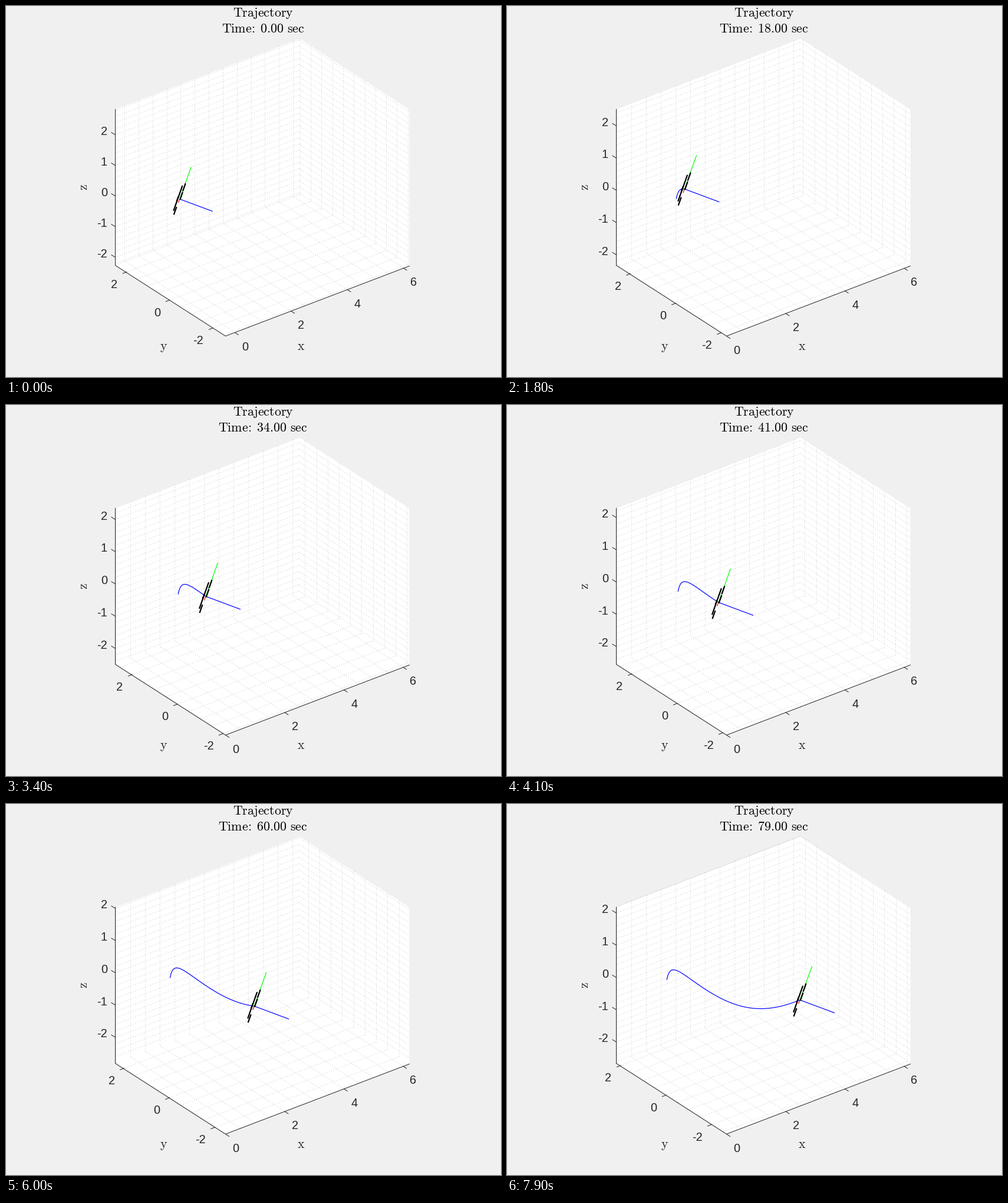
These frames come from a looping animation (840 px wide and 630 px high, 8000 ms). A matplotlib script:

```python
import matplotlib.pyplot as plt
import numpy as np
from matplotlib.animation import FuncAnimation
from matplotlib.collections import LineCollection

W, H, DPI = 840, 630, 100
FRAMES, STEP = 80, 100
PX = 72 / DPI                      # one pixel in points
INK = "#262626"

plt.rcParams["font.family"] = "Liberation Sans"
plt.rcParams["mathtext.fontset"] = "cm"

# Orthographic view: azimuth -37.5, elevation 30 degrees
AZ, EL = np.radians(37.5), np.radians(30)
EX = np.array([np.cos(AZ), -np.sin(AZ) * np.sin(EL)])
EY = np.array([-np.sin(AZ), -np.cos(AZ) * np.sin(EL)])
EZ = np.array([0, -np.cos(EL)])

FRONT = np.array([372, 560])       # screen corner of x, y, z minimum
BOX_W, BOX_D, BOX_H = 312, 187, 265
X_MAX = 6.22
SCALE = BOX_W / EX[0] / X_MAX

# Vehicle in pixels around its centre: body axes, rotors seen edge-on, arm
RED, GREEN, BLUE = (-2.5, 6.5), (20.5, -57.2), (59, 22)
ROTOR = np.array([-5, 14])
ROTORS = [np.array([p, p + ROTOR]) for p in ([10.5, -28], [5.5, -12.5], [-5.5, 14])]
BLADES = ROTORS + [np.array([[5, -24], [-11, 21]]), np.array([[-2, -5], [-5.5, 4]])]


def path(t):
    """Screen offset from the start: speeding up sideways, swinging vertically."""
    def ramp(s):
        return 51.75 * np.logaddexp(0, (s - 28) / 11.5)

    def swing(s):
        return 33 * np.sin(.0655 * (s - 39.95))

    return np.array([ramp(t) - ramp(0), swing(t) - swing(0)])


def ease(a, b, u):
    return a + (b - a) * (1 - np.cos(np.pi * u)) / 2


def y_centre(t):
    return ease(-.02, .33, t / 31) if t < 31 else ease(.33, -.22, (t - 31) / 48)


def z_centre(t):
    return max(.32 - .0006 * t * t, -.04) - .32 * np.sin(.063 * max(t - 38, 0))


def steps(lo, hi, unit):
    """Multiples of unit between lo and hi."""
    return unit * np.arange(np.ceil(lo / unit - 1e-6), np.floor(hi / unit + 1e-6) + 1)


def roman(*words):
    return "$" + r"\ ".join(r"\text{%s}" % w for w in words) + "$"


fig = plt.figure(figsize=(W / DPI, H / DPI), dpi=DPI, facecolor="#f0f0f0")
ax = fig.add_axes([0, 0, 1, 1])
ax.set_xlim(-.5, W - .5)
ax.set_ylim(H - .5, -.5)
ax.axis("off")


def segments(color, width, layer, **kw):
    lines = LineCollection([], colors=color, linewidths=width * PX, zorder=layer, **kw)
    ax.add_collection(lines, autolim=False)
    return lines


ax.fill([185, 498, 684, 684, 372, 185], [175, 55, 175, 441, 560, 440],
        color="white", lw=0, zorder=0)
ax.plot([185, 185, 372, 684], [175, 440, 560, 441], color=INK, lw=PX, zorder=2)
grid = segments([(.1, .1, .1, .25)], 1, 1, linestyles=[(0, (1, 3))])
ticks = segments(INK, 1, 2)
trail, = ax.plot([], [], color="#0000ff", lw=1.2 * PX, zorder=3)
triad = segments(["#ff0000", "#00ff00", "#0000ff"], 1.2, 4)
blades = segments("black", 2.2, 5)

tex = dict(fontsize=22 * PX, ha="center", va="baseline")
ax.text(435.5, 18, roman("Trajectory"), color="black", **tex)
clock = ax.text(435.5, 44.3, "", color="black", **tex)
ax.text(500, 583, roman("x"), color=INK, **tex)
ax.text(267.5, 583, roman("y"), color=INK, **tex)
ax.text(131.5, 307, roman("z"), color=INK, fontsize=22 * PX, rotation=90,
        ha="center", va="center")

labels = []


def tick(marks, at, way, value, shift, align):
    marks.append([at, at + way])
    x, y = at + shift
    labels.append(ax.text(x, y, str(int(round(value))), color=INK,
                          fontsize=20 * PX, ha=align, va="center_baseline"))


def draw(n):
    x0 = min(0, -.33 + .036 * n)
    scale = BOX_W / EX[0] / (X_MAX - x0)
    ex, ey, ez = EX * scale, EY * scale, EZ * scale
    dy, dz = BOX_D / -ey[0], BOX_H / -ez[1]
    y0, z0 = y_centre(n) - dy / 2, z_centre(n) - dz / 2
    y1, z1 = y0 + dy, z0 + dz

    def at(x, y, z):
        return FRONT + (x - x0) * ex + (y - y0) * ey + (z - z0) * ez

    lines = []
    for x in steps(x0, X_MAX, .5):
        lines.append([at(x, y0, z0), at(x, y1, z0), at(x, y1, z1)])
    for y in steps(y0, y1, .5):
        lines.append([at(x0, y, z0), at(X_MAX, y, z0), at(X_MAX, y, z1)])
    for z in steps(z0, z1, .2):
        lines.append([at(x0, y1, z), at(X_MAX, y1, z), at(X_MAX, y0, z)])
    grid.set_segments([p for a, b, c in lines for p in ([a, b], [b, c])])

    while labels:
        labels.pop().remove()
    marks = []
    for x in steps(x0, X_MAX, 2):
        tick(marks, at(x, y0, z0), (6.5, 4.2), x, (17.5, 22.8), "center")
    for y in steps(y0, y1, 2):
        tick(marks, at(x0, y, z0), (-7.5, 2.9), y, (-16, 20), "right")
    for z in steps(z0, z1, 1):
        tick(marks, at(x0, y1, z), (-7, -4.3), z, (-13.5, -7.4), "right")
    ticks.set_segments(marks)

    k = scale / SCALE
    trace = at(.015, 0, .945) + k * path(np.linspace(0, n, 2 * n + 1)).T
    pos = trace[-1]
    trail.set_data(*trace.T)
    triad.set_segments([[pos, pos + k * np.array(v)] for v in (RED, GREEN, BLUE)])
    blades.set_segments([pos + k * b for b in BLADES])
    clock.set_text(roman("Time:", r"}\,\text{" + f"{n:.2f}", "sec"))
    return []


anim = FuncAnimation(fig, draw, frames=FRAMES, interval=STEP, repeat=True,
                     repeat_delay=0, init_func=lambda: [], blit=False)
plt.show()
```
